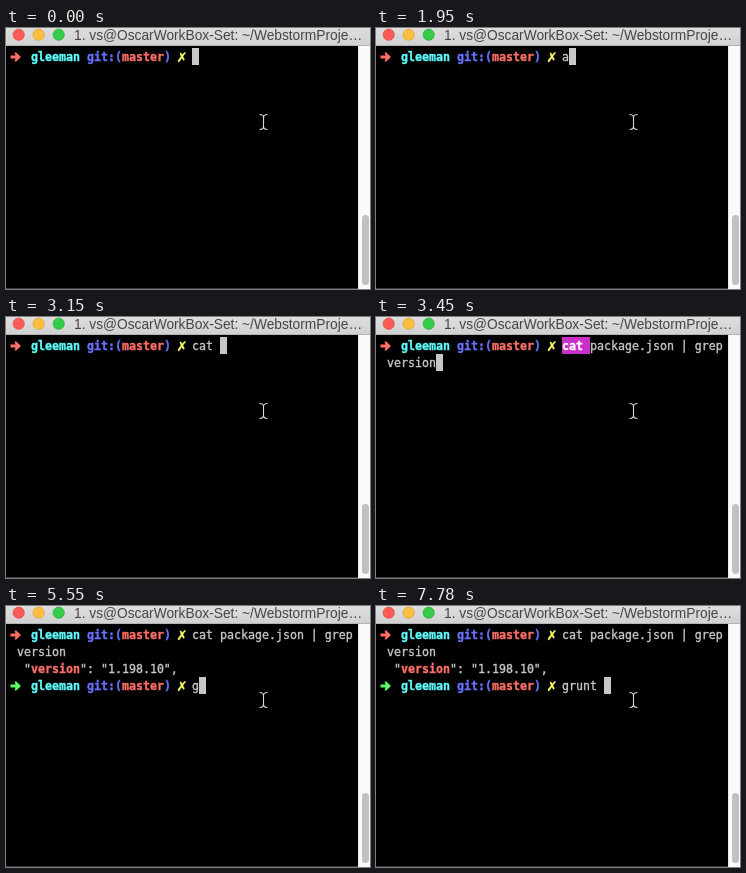
Recreate the animation shown at these times as an HTML page with a canvas. Size 364 px wide and 261 px high, loop 8000 ms.

```html
<!DOCTYPE html>
<html lang="en">
<head>
<meta charset="utf-8">
<title>Terminal</title>
<style>
html, body { margin: 0; width: 100%; height: 100%; overflow: hidden; background: #000; }
canvas { display: block; }
</style>
</head>
<body>
<canvas id="stage" width="364" height="261"></canvas>
<script>
const ctx = document.getElementById('stage').getContext('2d');
const LOOP = 8000, CELL = 7, ROW = 17, LEFT = 4, TOP = 20;
const MONO = '11.627px "DejaVu Sans Mono", monospace';
const grey = '#c7c7c7', red = '#ff6e67', green = '#5ffa68', cyan = '#60fdff',
      blue = '#6871ff', yellow = '#fffc67', magenta = '#ca30c7';

// [start time, typed text] for each prompt
const firstInput = [[0, ''], [450, 'a'], [750, 'at'], [1950, 'a'], [2100, ''],
                    [2400, 'c'], [2550, 'ca'], [2700, 'cat'], [3150, 'cat ']];
const secondInput = [[4200, ''], [5550, 'g'], [5690, 'gr'], [5840, 'gru'],
                     [5990, 'grun'], [6280, 'grunt'], [7780, 'grunt ']];
const RECALL = 3450, RUN = 4200;

const typed = (steps, t) => steps.filter(([start]) => start <= t).pop()[1];
const x = col => LEFT + col * CELL;
const y = row => TOP + row * ROW;

function rect(color, left, top, w, h) {
  ctx.fillStyle = color;
  ctx.fillRect(left, top, w, h);
}

// A thin outline gives the glyphs the weight of smoothed screen type.
function glyphs(str, left, base, color, font) {
  ctx.font = font;
  ctx.fillStyle = ctx.strokeStyle = color;
  ctx.lineWidth = 0.35;
  ctx.fillText(str, left, base);
  ctx.strokeText(str, left, base);
}

function text(str, col, row, color = grey, bold = false) {
  glyphs(str, x(col), y(row) + 13, color, (bold ? 'bold ' : '') + MONO);
}

function block(col, row, color = grey, cells = 1) {
  rect(color, x(col), y(row), cells * CELL, ROW);
}

function dot(cx, color, edge) {
  ctx.beginPath();
  ctx.arc(cx, 6.7, 5.6, 0, 7);
  ctx.fillStyle = color;
  ctx.fill();
  ctx.strokeStyle = edge;
  ctx.lineWidth = 0.7;
  ctx.stroke();
}

function arrow(row, color) {
  const cy = y(row) + 9;
  ctx.fillStyle = color;
  ctx.fill(new Path2D(`M4.5 ${cy - 1.5}h5l-1-3h1.8l4.7 4.5-4.7 4.5h-1.8l1-3h-5z`));
}

function prompt(row, color) {
  arrow(row, color);
  text('gleeman', 3, row, cyan, true);
  text('git:(', 11, row, blue, true);
  text('master', 16, row, red, true);
  text(')', 22, row, blue, true);
  glyphs('✗', x(24) - 1.5, y(row) + 14, yellow, 'bold 13px "DejaVu Sans", sans-serif');
}

function titleBar() {
  const shade = ctx.createLinearGradient(0, 0, 0, 18);
  shade.addColorStop(0, '#dedede');
  shade.addColorStop(1, '#d0d0d0');
  rect(shade, 0, 0, 364, 18);
  rect('#b4b4b4', 0, 17, 364, 1);
  dot(12.7, '#fc5b57', '#e2463f');
  dot(32.7, '#fdbe41', '#e0a028');
  dot(52.7, '#35cc4b', '#24ad32');
  ctx.font = '13.75px "Liberation Sans", Arial, sans-serif';
  ctx.fillStyle = '#454545';
  ctx.fillText('1. vs@OscarWorkBox-Set: ~/WebstormProje…', 68, 12);
}

function scrollBar() {
  rect('#fafafa', 352, 18, 12, 243);
  rect('#e8e8e8', 352, 18, 1, 243);
  ctx.fillStyle = '#c1c1c1';
  ctx.beginPath();
  ctx.roundRect(356, 187, 7, 70, 3.5);
  ctx.fill();
}

function pointer() {
  const beam = new Path2D('M253.5 86.5q4 0 4 3v9q0 3-4 3M261.5 86.5q-4 0-4 3v9q0 3 4 3');
  ctx.strokeStyle = '#d8d8d8';
  ctx.lineWidth = 1.1;
  ctx.stroke(beam);
}

function draw(t) {
  rect('#000', 0, 0, 364, 261);
  rect('#3a3a3a', 0, 260, 364, 1);
  prompt(0, red);
  if (t < RECALL) {
    const input = typed(firstInput, t);
    text(input, 26, 0);
    block(26 + input.length, 0);
  } else {
    const searching = t < RUN;
    if (searching) block(26, 0, magenta, 4);
    text('cat', 26, 0, searching ? '#fff' : grey, searching);
    text('package.json | grep', 30, 0);
    text('version', 1, 1);
    if (searching) block(8, 1);
  }
  if (t >= RUN) {
    text('"', 2, 2);
    text('version', 3, 2, red, true);
    text('": "1.198.10",', 10, 2);
    prompt(3, green);
    const input = typed(secondInput, t);
    text(input, 26, 3);
    block(26 + input.length, 3);
  }
  titleBar();
  scrollBar();
  pointer();
}

function tick() {
  draw(performance.now() % LOOP);
  requestAnimationFrame(tick);
}
tick();
</script>
</body>
</html>
```
